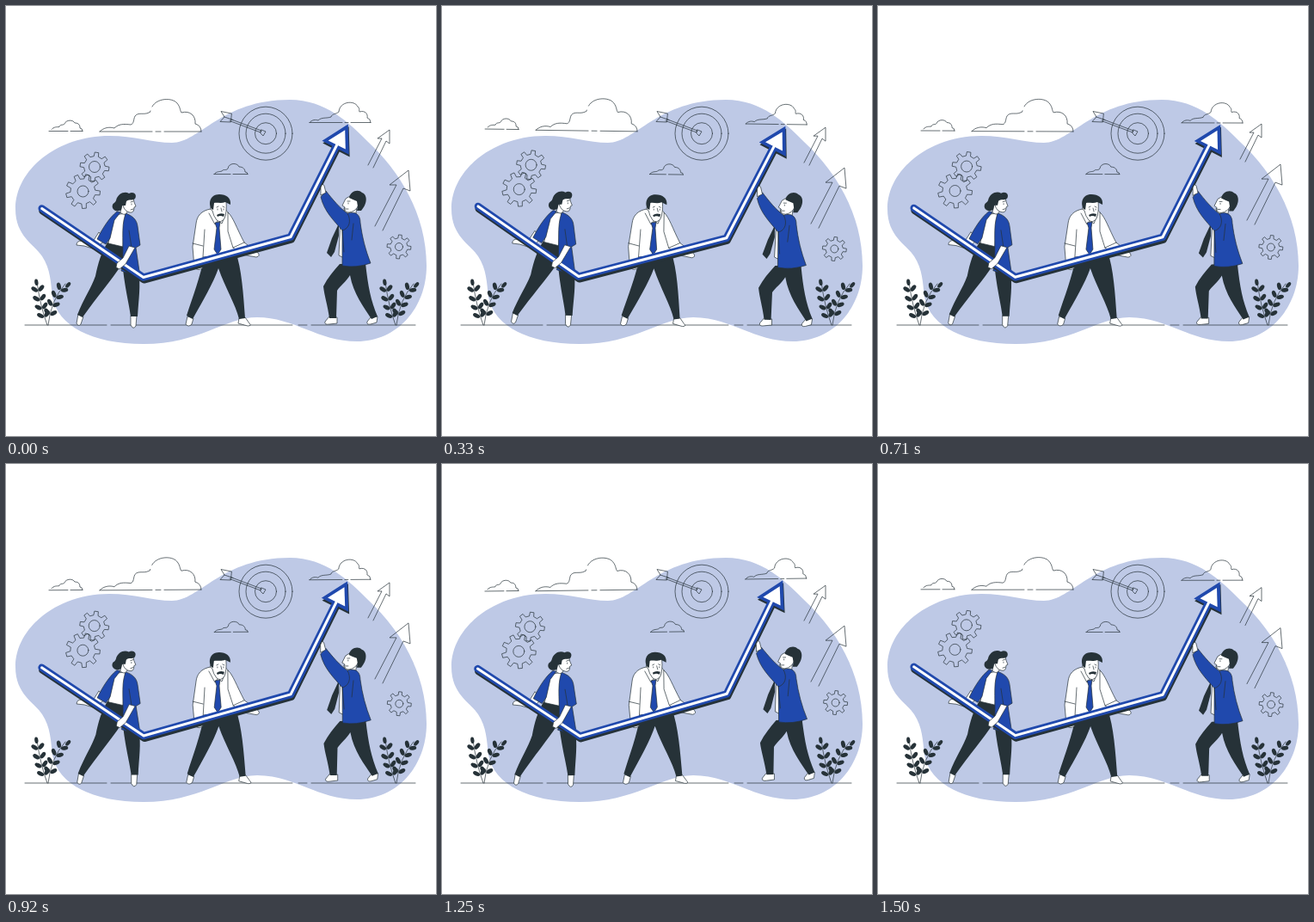
Animation, 500 px wide and 500 px high, one loop 1540 ms. Source, as an HTML page:

```html
<!DOCTYPE html>
<html lang="en">
<head>
<meta charset="utf-8">
<title>Team lifting an arrow</title>
<style>
  html, body { margin: 0; width: 100%; height: 100%; overflow: hidden; background: #fff; }
  svg { display: block; width: 100vw; height: 100vh; }
  .line { fill: none; stroke: #263238; stroke-width: .7; stroke-linecap: round; stroke-linejoin: round; }
  .white { fill: #fff; stroke: #263238; stroke-width: .7; stroke-linejoin: round; }
  .dark { fill: #263238; }
  .blue { fill: #2049ad; stroke: #263238; stroke-width: .7; stroke-linejoin: round; }
  .bar { fill: none; stroke-linecap: round; stroke-linejoin: round; }
</style>
</head>
<body>
<svg viewBox="0 0 500 500">
  <path fill="#bec9e6" d="M11 236C11 190 60 151 120 151C150 151 170 159 193 159C225 159 250 109 330 109C372 109 399 136 421 158C457 191 489 242 489 302C489 351 455 390 408 390C363 390 335 362 292 362C255 362 225 393 160 393C100 393 60 372 54 338C52 322 52 306 42 291C33 277 11 268 11 236Z"/>
  <path class="line" d="M22 371H117M122 371H333M340 371H350M355 371H476"/>

  <g id="clouds" class="line">
    <path d="M53 143.500C56 140 59 141 62 140.500C63 137 67 139 68 137C70 132 78 132 80 136C85 136 86 139 86 142Q89 142 89 145.500M50 145.500H72M75 145.500H89"/>
    <path d="M109 146C113 142 119 140 126 142C131 137 137 137 145 138C149 137 148 132 150 128C154 123 160 127 166 124Q168 124 168 122M170 117C175 107 193 106 199 113C203 118 202 121 204 124C214 121 221 128 220 137Q227 139 227 146M109 146H170M174 146H180M184 146H227"/>
    <path d="M242 195.500C245 192 248 193 251 192C253 189 256 192 258 189C259 182 269 182 271 187C276 187 278 190 278 193Q281 193 281 195.500M242 195.500H261M264 195.500H281"/>
    <path d="M353 135.500C356 132 360 132 363 133C367 129 372 131 378 129C379 125 384 126 387 123C388 111 405 109 409 117C412 120 410 121 411 123C418 121 421 126 420 130Q424 131 424 135.500M353 135.500H391M394 135.500H398M401 135.500H424"/>
  </g>

  <g class="line">
    <circle cx="302" cy="148.200" r="31"/><circle cx="302" cy="148.200" r="23"/><circle cx="302" cy="148.200" r="12.500"/>
    <path d="M261 131.500L297 145L296 147L260 133.500M262 125L250 122.500L254 129L249 134.500L261 135ZM254 129L264 132.500M297 144L302 146L299 151L296 148Z"/>
  </g>

  <g id="gears" class="line"></g>

  <g id="risers" class="line">
    <path d="M421 185L437 154L432 154L446 144L446 160L442 157L427 188"/>
    <path d="M429 256L454 208L446 208L468 191L470 215L462 212L438 261"/>
  </g>

  <g id="plant"></g>
  <use href="#plant" x="405"/>

  <g id="team">
    <!-- woman -->
    <path class="white" d="M108 263L101 274L88 273Q82 273 82 278L91 279L104 283L115 272Z"/>
    <path class="white" d="M84 358L82 369Q84 373 87 370L90 361ZM145 360L145 371Q148 377 151 372L152 360Z"/>
    <path class="dark" d="M118 275L135 277L154 308C157 325 154 342 153 361L145 361C143 345 139 332 136 306L133 303C123 318 106 338 89 362L83 359C90 341 99 328 104 314C107 299 111 286 118 275Z"/>
    <path class="white" d="M126 243L139 241L136 280L119 276Z"/>
    <path class="blue" d="M129 239C120 246 112 259 106 271L116 277L121 270L126 249L133 240Z"/>
    <path class="blue" d="M139 241C147 244 152 248 153 256L156 278L151 281L156 315L134 308C138 291 134 263 137 249Z"/>
    <path class="line" d="M143 261L146 281"/>
    <path class="white" d="M135 231L133 240Q137 244 140 241L142 238Z"/>
    <path class="white" d="M136 226L148 223L149 228L151 233L149 234Q149 241 144 240Q138 239 136 232Z"/>
    <path class="dark" d="M134 237C128 241 122 236 124 231C125 229 127 229 128 226C130 218 138 215 143 218C148 215 153 219 150 224C147 227 143 224 140 227L139 232Q137 232 135 232Z"/>
    <path class="line" d="M145 228L148 227M146 230V231M145 237L148 236"/>

    <!-- man in the middle -->
    <path class="white" d="M211 361L209 370Q212 374 216 370L218 363ZM271 363L270 369L281 372Q286 372 283 369L278 362Z"/>
    <path class="dark" d="M231 288L267 286C274 305 276 335 278 363L271 364C267 347 255 328 247 305C241 322 230 341 217 364L210 360C217 338 226 316 231 288Z"/>
    <path class="white" d="M238 236C227 238 222 244 221 253L217 280L219 304Q224 309 229 304L229 292L267 289L261 246Q258 237 253 236Z"/>
    <path class="white" d="M258 240C264 245 268 258 277 275L293 287Q296 291 291 292L275 289L264 281L258 262Z"/>
    <path class="line" d="M229 292L231 260M217 276L229 279M264 281L277 275M236 241L243 254L246 250M255 243L251 253L247 250"/>
    <path class="blue" d="M243 252L249 251L248 258L250 283L246 289L242 283L245 258Z"/>
    <path class="white" d="M240 227L256 227Q257 240 254 247Q250 253 245 249Q241 244 240 238Q236 236 239 232Z"/>
    <path class="dark" d="M239 236C235 230 237 219 248 219C256 219 262 223 261 231L255 228C250 230 245 228 242 229L241 237ZM245 243Q249 240 254 242L253 245Q249 243 246 245Z"/>
    <path class="line" d="M245 234L247 233M252 233L254 234M246 236V237M253 236V237M250 235L251 239"/>

    <!-- man on the right -->
    <path class="white" d="M376 361L371 367Q370 371 376 370L385 369L385 362ZM424 362L420 367Q419 371 424 370L431 368L432 361Z"/>
    <path class="dark" d="M388 300L418 299C421 326 424 342 432 361L425 364C416 350 404 335 400 313C396 320 388 326 385 331L384 363L376 363C374 348 370 336 369 326C374 316 381 308 388 300Z"/>
    <path class="white" d="M389 246L397 240L393 293L387 290Z"/>
    <path class="dark" d="M387 253L379 270L373 287L378 292L382 286L387 267Z"/>
    <path class="white" d="M393 235L394 241Q400 246 407 241L408 232Z"/>
    <path class="white" d="M400 221L395 224L391 232L394 234Q393 240 399 240Q407 239 410 231L409 222Z"/>
    <path class="dark" d="M399 223C400 216 409 212 414 217C420 219 421 229 413 238L408 238L409 233L408 227Q403 225 399 223Z"/>
    <path class="line" d="M397 227L400 227M398 229V230M395 236L398 236"/>
    <path class="blue" d="M397 241C407 238 412 243 412 252C414 268 418 284 424 299Q407 305 391 302L391 261Z"/>
    <path class="blue" d="M366 222L372 215C379 224 389 236 397 241C402 250 399 259 391 261C381 249 370 239 366 222Z"/>
    <path class="line" d="M391 261L393 286M404 253L402 272"/>

    <g id="arrow"></g>

    <path class="white" d="M143 279L136 293L129 299L128 304L132 306L139 300L150 281Z"/>
    <path class="white" d="M366 220L366 211Q368 205 370 209L372 217Z"/>
  </g>
</svg>
<script>
const PERIOD = 1540, STEPS = 37;
const el = id => document.getElementById(id);
const point = (r, a) => (r * Math.cos(a)).toFixed(2) + ' ' + (r * Math.sin(a)).toFixed(2);

function gear(x, y, outer, hole, teeth, turn) {
  const pitch = 2 * Math.PI / teeth, inner = outer * .73, pts = [];
  for (let i = 0; i < teeth; i++) {
    for (const [r, a] of [[inner, -.27], [outer, -.17], [outer, .17], [inner, .27]]) {
      pts.push(point(r, (i + a) * pitch + turn));
    }
  }
  return `<g transform="translate(${x} ${y})"><path d="M${pts.join('L')}Z"/><circle r="${hole}"/></g>`;
}

function stem(x0, y0, cx, cy, x1, y1) {
  let out = `<path class="line" d="M${x0} ${y0}Q${cx} ${cy} ${x1} ${y1}"/>`;
  const leaf = (x, y, a, size) =>
    `<ellipse class="dark" cx="${size + 1}" rx="${size}" ry="${size * .56}" transform="translate(${x} ${y}) rotate(${a})"/>`;
  const degrees = (dy, dx) => Math.atan2(dy, dx) * 180 / Math.PI;
  for (let i = 0; i < 4; i++) {
    const t = .2 + i * .2, s = 1 - t;
    const x = s * s * x0 + 2 * s * t * cx + t * t * x1;
    const y = s * s * y0 + 2 * s * t * cy + t * t * y1;
    const dir = degrees(s * (cy - y0) + t * (y1 - cy), s * (cx - x0) + t * (x1 - cx));
    out += leaf(x, y, dir - 48, 4.3) + leaf(x, y, dir + 48, 4.3);
  }
  return out + leaf(x1, y1 + 5, degrees(y1 - cy, x1 - cx), 3.8);
}

function arrow() {
  const shaft = 'M41.7 235.5L159.7 315.5L331 268.5L385.500 160', head = 'M395.700 141.500L372 156.500L396.500 169Z';
  const layer = (color, shift) => `<g transform="translate(${shift})" stroke="${color}">` +
    `<path class="bar" stroke-width="8.500" d="${shaft}"/>` +
    `<path fill="${color}" stroke-width="4.500" d="${head}"/></g>`;
  return layer('#263238', '.8 2.800') + layer('#2049ad', '0 0') +
    `<path class="bar" stroke="#fff" stroke-width="3" d="${shaft}"/>` +
    '<path fill="#fff" d="M394.200 144.300L374.700 156.500L394.800 166.500Z"/>';
}

el('gears').innerHTML = gear(103, 187, 17, 6.5, 8, .15) +
  gear(89.5, 215.5, 20, 6.5, 9, .1) + gear(457, 280, 14, 4.5, 8, .1);
el('plant').innerHTML = stem(48, 371, 40, 350, 36, 321) + stem(49, 371, 52, 342, 69, 323);
el('arrow').innerHTML = arrow();

const sway = { clouds: '237 152', gears: '270 232', team: '235 256' };

function draw() {
  const p = Math.floor(performance.now() % PERIOD / PERIOD * STEPS) / STEPS;
  const angle = p < .25 ? 4 * p : p < .75 ? 2 - 4 * p : 4 * p - 4;
  const lift = 7.5 * (1 - Math.abs(2 * p - 1));
  for (const id in sway) el(id).setAttribute('transform', `rotate(${angle} ${sway[id]})`);
  el('risers').setAttribute('transform', `translate(0 ${-lift})`);
  requestAnimationFrame(draw);
}
draw();
</script>
</body>
</html>
```
